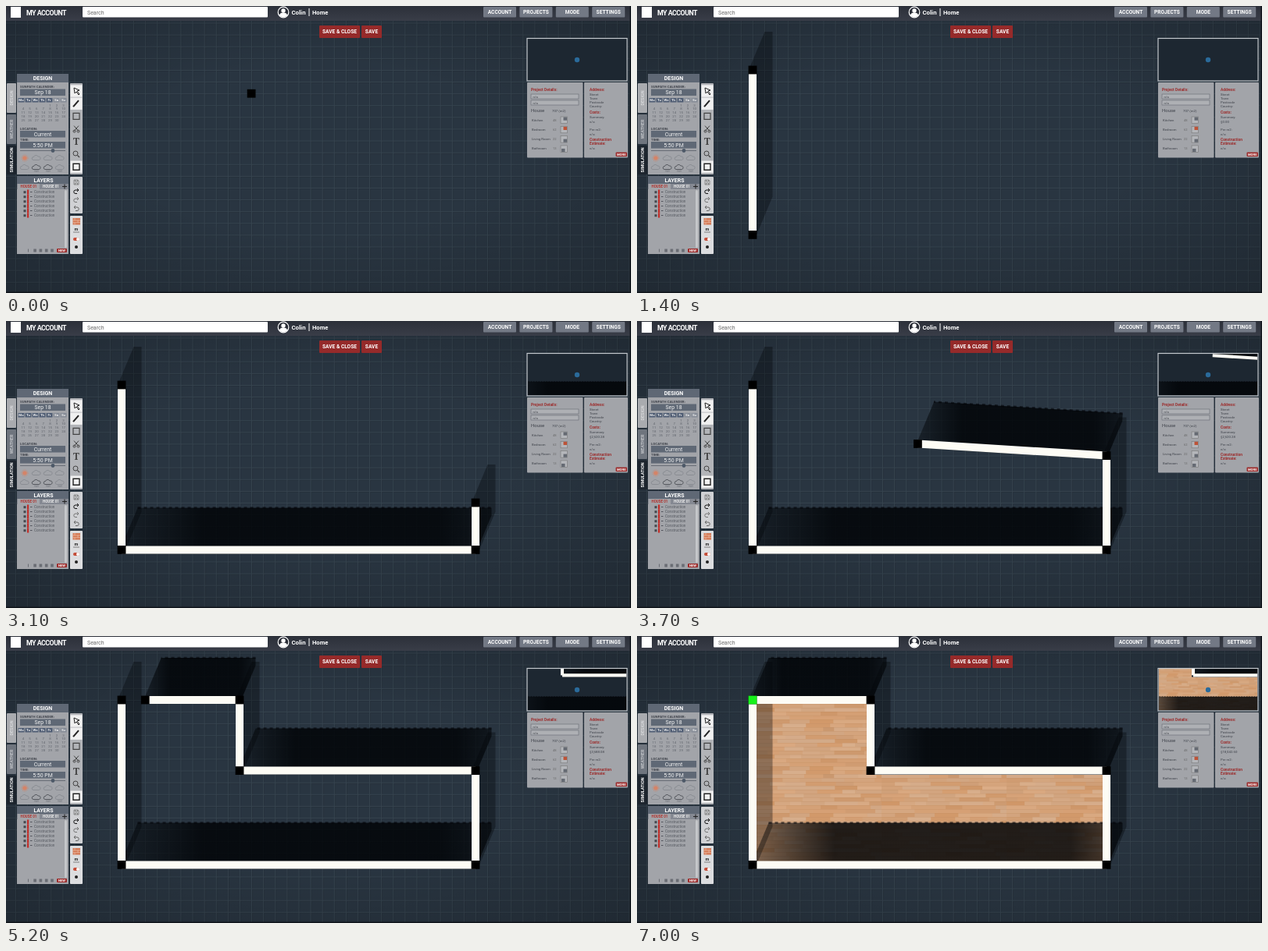
Recreate the animation shown at these times as an HTML page. Size 800x368 px, loop 7.1 s.

```html
<!DOCTYPE html>
<html lang="en">
<head>
<meta charset="utf-8">
<title>Floor plan editor</title>
<style>
html, body { margin: 0; width: 100%; height: 100%; overflow: hidden; background: #27333f; }
svg { display: block; width: 100%; height: 100%; font-family: Roboto, "Open Sans", sans-serif; }
</style>
</head>
<body>
<svg id="stage" viewBox="0 0 800 368"></svg>
<script>
const LOOP = 7100, STEP = 100, CELL = 15.1, OX = 148, OY = 82;
const RED = '#9c2b2b', INK = '#3d4149', BAR = '#5f6875', PANEL = '#a2a4a9';
const SHADOW = [20.5, -49], HALF = 5;

// Corners in grid cells, and the time each wall is started
const corners = [[0, 0], [0, 14], [30, 14], [30, 6], [10, 6], [10, 0], [0, 0]];
const starts = [800, 1700, 2800, 3400, 4300, 4900];
// Pointer: time, column, row
const path = [
  [0, 11, 2], [800, 0, 0], [1400, 0, 14], [1700, 0, 14], [2100, 25, 15], [2500, 30, 14],
  [2800, 30, 14], [3100, 30, 10], [3200, 30, 6], [3400, 30, 6], [3700, 14, 5], [4200, 10, 6],
  [4300, 10, 6], [4600, 10, 0], [4900, 10, 0], [5200, 2, 0], [5300, 2, 0], [5500, 0, 0]
];
const CLOSED = 5500, FLOOR = 5700;
const costs = [[0, 'n/a'], [900, '$0.00'], [1800, '$1,671.80'], [2900, '$2,620.28'],
  [4400, '$3,124.46'], [4800, '$3,688.08'], [5700, '$17,415.20'], [6800, '$18,042.60']];

let seed = 11;
const rand = () => (seed = (seed * 16807) % 2147483647) / 2147483647;

// Markup helpers
const rect = (x, y, w, h, fill, more = '') =>
  `<rect x="${x}" y="${y}" width="${w}" height="${h}" fill="${fill}" ${more}/>`;
const line = (d, stroke = INK, w = 1, more = '') =>
  `<path d="${d}" fill="none" stroke="${stroke}" stroke-width="${w}" ${more}/>`;
const text = (x, y, s, size, fill = INK, weight = 400, anchor = 'start', more = '') =>
  `<text x="${x}" y="${y}" font-size="${size}" fill="${fill}" font-weight="${weight}" text-anchor="${anchor}" ${more}>${s}</text>`;
const mid = (x, y, s, size, fill = '#fff', weight = 500, more = '') =>
  text(x, y, s, size, fill, weight, 'middle', more);
const button = (x, y, w, h, label, fill, size) =>
  rect(x, y, w, h, fill, 'rx="1"') + mid(x + w / 2, y + h / 2 + size * .36, label, size, '#fff', 600);
const at = (x, y, body) => `<g transform="translate(${x} ${y})">${body}</g>`;

function planks() {
  let s = rect(0, 0, 160, 60, '#d5a579');
  for (let y = 0; y < 60; y += 5) {
    for (let x = 0; x < 160;) {
      const w = Math.min(14 + rand() * 30, 160 - x);
      s += rect(x.toFixed(1), y, w.toFixed(1), 5, `hsl(27 ${46 + rand() * 8}% ${61 + rand() * 9}%)`);
      x += w;
    }
    s += rect(0, y, 160, .5, '#b98759', 'opacity=".5"');
  }
  return s;
}

function defs() {
  const stops = [[0, .4], [.22, .84], [.86, .84], [1, .6]]
    .map(([o, a]) => `<stop offset="${o}" stop-color="#000306" stop-opacity="${a}"/>`).join('');
  return `<defs>
    <linearGradient id="dark">${stops}</linearGradient>
    <linearGradient id="head" x2="0" y2="1"><stop stop-color="#2c3039"/><stop offset="1" stop-color="#393d48"/></linearGradient>
    <radialGradient id="vignette" r=".75"><stop offset=".4" stop-color="#000" stop-opacity="0"/><stop offset="1" stop-color="#000" stop-opacity=".25"/></radialGradient>
    <pattern id="grid" x="${OX}" y="${OY}" width="${CELL}" height="${CELL}" patternUnits="userSpaceOnUse">
      ${rect(0, 0, CELL, CELL, '#293541')}${line(`M0 .5H${CELL}M.5 0V${CELL}`, '#36444f')}
      ${line(`M1 1.5H${CELL}M1.5 1V${CELL}`, '#232e39', .8)}</pattern>
    <pattern id="wood" x="153" y="87" width="160" height="60" patternUnits="userSpaceOnUse">${planks()}</pattern>
    <clipPath id="mapView">${rect(668, 42, 126, 53, '#000')}</clipPath></defs>`;
}

function header() {
  const tabs = ['ACCOUNT', 'PROJECTS', 'MODE', 'SETTINGS'];
  return rect(0, 0, 800, 19, 'url(#head)') + rect(6, 1, 13, 14, '#fff') +
    text(26, 11.5, 'MY ACCOUNT', 8.8, '#fff', 600, 'start', 'letter-spacing="-.5"') +
    rect(98, 1, 237, 13.5, '#fff', 'rx="1"') + text(104, 10.7, 'Search', 7, '#666') +
    '<circle cx="355" cy="8" r="6.8" fill="#2b2e37" stroke="#fff" stroke-width="1.2"/>' +
    '<circle cx="355" cy="6" r="2.7" fill="#fff"/><path d="M350 12.5q0-4 5-4t5 4q-5 3.4-10 0" fill="#fff"/>' +
    text(365.5, 11, 'Colin', 7.8, '#fff', 600) + rect(387.5, 3, 1, 10, '#fff') +
    text(392, 11, 'Home', 7.6, '#fff', 600) +
    tabs.map((s, i) => button(611 + i * 46.4, 1, 42, 13.5, s, '#737985', 6.6)).join('') +
    button(401, 25, 52, 16, 'SAVE &amp; CLOSE', '#952a2a', 6.6) + button(455, 25, 26, 16, 'SAVE', '#952a2a', 6.6);
}

function calendar() {
  let s = '';
  ['Mo', 'Tu', 'We', 'Th', 'Fr', 'Sa', 'Su'].forEach((d, i) => {
    s += rect(15.5 + i * 9, 118, 8, 5.5, i < 5 ? '#4e5c73' : '#858b96') +
      mid(19.5 + i * 9, 122.4, d, 4.4, '#eee', 700);
  });
  for (let d = 1; d <= 30; d++) {
    const k = d + 3;
    s += mid(22 + k % 7 * 8.6, 128.5 + Math.floor(k / 7) * 4.9, d, 4.4, '#62666e', 400);
  }
  return s;
}

function weather() {
  const cloud = c => `<path d="M-4 2.5a2 2 0 0 1 .5-4a3 3 0 0 1 5.500-.5a2.300 2.300 0 0 1 1.500 4.500z" fill="none" stroke="${c}" stroke-width=".8"/>`;
  let s = '<circle cx="24" cy="195" r="2.8" fill="#d48468"/>' +
    '<circle cx="24" cy="195" r="4" fill="none" stroke="#d48468" stroke-dasharray="1 1.100"/>';
  for (let i = 1; i < 8; i++) {
    const x = 24 + i % 4 * 15, y = i < 4 ? 195 : 207;
    s += at(x, y, cloud(i === 5 || i === 6 ? '#44484f' : '#85888e') +
      (i > 4 ? line('M-2 3.500v2M0 3.500v2.500M2 3.500v2', '#666a71', .7) : ''));
  }
  return s;
}

function tools() {
  const icons = [
    line('M-3-4L4-1L1 0L4 4L3 5L0 1L-2 3Z', '#222'),
    line('M-4 4L3-4', '#222', 2),
    line('M-4-4H4V4H-4Z', '#444', 1.2),
    line('M-3-4L3 3M3-4L-3 3', '#444') + line('M-4 3a1.500 1.500 0 1 0 3 0a1.500 1.500 0 1 0-3 0M1 3a1.500 1.500 0 1 0 3 0a1.500 1.500 0 1 0-3 0', '#444'),
    mid(0, 4.3, 'T', 12, '#444', 700, 'font-family="Noto Serif, serif"'),
    '<circle cx="-1" cy="-1" r="3" fill="none" stroke="#444"/>' + line('M1.500 1.500L4 4', '#444', 1.3),
    line('M-4-4H4V4H-4Z', '#222', 1.4)
  ];
  let s = rect(82, 99, 16, 117, '#b2b4b8', 'rx="1"');
  icons.forEach((icon, i) => {
    const y = 109 + i * 16.2;
    if (i < 2 || i === 6) s += rect(82.5, y - 7.700, 15, 15.4, '#f0f0f0');
    s += at(90, y, icon);
  });
  const turn = c => line('M-2.500-1H1a2 2 0 0 1 0 4.500H-1M-1-3L-3-1L-1 1', c);
  s += rect(82, 219, 16, 47, '#d0d1d4', 'rx="1"') + rect(82, 269, 16, 49, '#dcdddf', 'rx="1"');
  s += at(90, 226, line('M-3-3H2L3-2V3H-3ZM-1.500-3V-1H1.500V-3M-1.500 3V1H1.500V3', '#777', .8));
  [['#111', -1], ['#777', -1], ['#666', 1]].forEach(([c, flip], i) => {
    s += `<g transform="translate(90 ${237 + i * 11}) scale(${flip} 1)">${turn(c)}</g>`;
  });
  return s + rect(85.500, 272, 9.500, 8.500, '#d47a56') +
    line('M85.500 274.800H95M85.500 277.700H95M88 272v2.800M92 274.800v2.900M88 277.700v2.800', '#f0c9b5', .6) +
    mid(90, 288, 'm', 5.500, '#222', 700) + line('M86 290H94', '#555', .7) +
    rect(86, 297, 8, 4, '#c44d38', 'rx="2"') + '<circle cx="92" cy="299" r="2" fill="#fff"/>' +
    '<circle cx="90" cy="309" r="2" fill="#222"/>';
}

function designPanel() {
  const field = (y, s) => rect(18, y, 58, 8.500, BAR) + mid(47, y + 6.800, s, 6.900, '#f2f2f2', 400);
  const side = (y, h, s, fill, ink) => rect(1, y, 12, h, fill, 'rx="1"') +
    mid(0, 0, s, 5.400, ink, 600, `transform="translate(9 ${y + h / 2}) rotate(-90)"`);
  return side(99, 38, 'DESIGN', '#a9abaf', '#d8d9db') + side(139, 38, 'WEATHER', '#6f757e', '#c3c6ca') +
    side(179, 37, 'SIMULATION', '#1d252e', '#fff') +
    rect(14, 87, 66, 11, BAR) + mid(47, 95.400, 'DESIGN', 7, '#fff', 700) +
    rect(14, 98, 66, 118, PANEL) + text(18, 104.700, 'SUNPATH CALENDER:', 4.400, INK, 700) +
    field(106.500, 'Sep 18') + calendar() + text(18, 158.700, 'LOCATION:', 4.400, INK, 700) +
    field(160, 'Current') + text(18, 172.600, 'TIME:', 4.400, INK, 700) + field(174, '5:50 PM') +
    rect(18, 185, 58, 1, '#666b74') + '<circle cx="60" cy="185.500" r="2.400" fill="#4d5968"/>' + weather();
}

function layersPanel() {
  let s = rect(14, 218, 66, 10, BAR) + mid(48, 225.900, 'LAYERS', 7, '#fff', 700) +
    rect(14, 228, 66, 90, PANEL) + rect(14, 228, 66, 7, '#858992') +
    rect(15, 228, 28, 7, PANEL) + text(18.500, 233.200, 'HOUSE 01', 4.500, '#b3322d', 700) +
    text(47, 233.200, 'HOUSE 01', 4.500, '#eee', 700) + line('M75 228.500V234.500M72 231.500H78', '#222') +
    rect(75, 236, 3, 74, '#c5c7ca', 'rx="1.500"');
  for (let i = 0; i < 6; i++) {
    const y = 238.500 + i * 6;
    s += rect(22.500, y - 1.300, 3, 3, '#44484f') + rect(27, y - 3, 2.200, 6, '#c22f2a') +
      line(`M31 ${y}h2.500`, INK, .8) + text(36, y + 1.600, 'Construction', 4.600, '#555960');
  }
  for (let i = 0; i < 5; i++) s += rect(28 + i * 7.300, 311.500, i ? 3.600 : 1, 4, '#6a6d74');
  return s + button(65, 311, 13, 5, 'NEW', RED, 4.200);
}

function details() {
  const box = y => rect(672, y, 61, 6, '#aeb0b4', 'stroke="#666a72" stroke-width=".6"') + text(674.500, y + 4.500, 'n/a', 4.200);
  let s = rect(667, 98, 71.500, 96.500, PANEL, 'rx="1"') + rect(740, 98, 56, 96.500, PANEL, 'rx="1"') +
    text(672, 108.500, 'Project Details:', 4.900, RED, 700) + box(113) + box(121) +
    text(672, 136, 'House', 6) + text(699, 136, '707 (m2)', 4.300);
  ['Kitchen', 'Bedroom', 'Living Room', 'Bathroom'].forEach((name, i) => {
    const y = 147.500 + i * 12.300;
    s += text(673, y, name, 4.300) + text(700, y, [48, 62, 22, 13][i], 4, '#666') +
      rect(710, y - 5.500, 8.500, 8.500, '#b4b6ba', 'stroke="#777" stroke-width=".6"') +
      rect(i === 3 ? 711 : 713.500, y - (i < 2 ? 5 : 1.500), 4.500, 4.200, i === 1 ? '#bd5338' : '#656a73');
  });
  const rows = [[114.500, 'Street'], [119.500, 'Town'], [124.500, 'Postcode'], [129.500, 'Country:'],
    [143.600, 'Summary:'], [160, 'Per m2:'], [165.600, 'n/a'], [183.500, 'n/a']];
  const heads = [[108.500, 'Address:'], [137.800, 'Costs:'], [173, 'Construction'], [178, 'Estimate:']];
  s += rows.map(([y, n]) => text(747, y, n, 4.300)).join('') +
    heads.map(([y, n]) => text(747, y, n, 4.800, RED, 700)).join('');
  return s + `<text id="cost" x="747" y="149.600" font-size="4.300" fill="${INK}"></text>` +
    button(780.500, 187.500, 14.500, 5.500, 'MORE', RED, 4.200);
}

const minimap = () => rect(667, 41, 128.500, 55.500, '#1d2731') +
  '<g clip-path="url(#mapView)"><use href="#plan" transform="matrix(.41 0 0 .41 589.400 -20.400)"/></g>' +
  rect(667, 41.500, 128, 54.500, 'none', 'stroke="#c4c8cd" stroke-width="1.200"') +
  '<circle cx="731" cy="69" r="3.200" fill="#2a6a9a"/>';

document.getElementById('stage').innerHTML = defs() + rect(0, 0, 800, 368, 'url(#grid)') +
  rect(0, 0, 800, 368, 'url(#vignette)') + '<g id="plan"></g><g id="dots"></g>' +
  header() + designPanel() + layersPanel() + tools() + minimap() + details() +
  rect(0, 366.500, 800, 1.500, '#10151b') + rect(798.500, 0, 1.500, 368, '#10151b');

const plan = document.getElementById('plan');
const dots = document.getElementById('dots');
const cost = document.getElementById('cost');
const place = ([c, r]) => [OX + c * CELL, OY + r * CELL];

function pointer(t) {
  const i = path.findIndex(p => p[0] > t);
  if (i < 0) return [0, 0];
  const a = path[i - 1], b = path[i], k = (t - a[0]) / (b[0] - a[0]);
  return [1, 2].map(n => Math.round(a[n] + (b[n] - a[n]) * k));
}

function hull(pts) {
  const cross = (o, a, b) => (a[0] - o[0]) * (b[1] - o[1]) - (a[1] - o[1]) * (b[0] - o[0]);
  const half = list => {
    const out = [];
    for (const p of list) {
      while (out.length > 1 && cross(out[out.length - 2], out[out.length - 1], p) <= 0) out.pop();
      out.push(p);
    }
    return out.slice(0, -1);
  };
  const sorted = [...pts].sort((a, b) => a[0] - b[0] || a[1] - b[1]);
  return [...half(sorted), ...half(sorted.reverse())];
}

function shade([x1, y1], [x2, y2]) {
  const len = Math.hypot(x2 - x1, y2 - y1);
  if (!len) return '';
  const nx = -(y2 - y1) / len * HALF, ny = (x2 - x1) / len * HALF;
  const bar = [[x1 + nx, y1 + ny], [x2 + nx, y2 + ny], [x2 - nx, y2 - ny], [x1 - nx, y1 - ny]];
  const [sx, sy] = SHADOW;
  const far = bar.map(([x, y]) => [x + sx, y + sy]);
  const flat = Math.abs(x2 - x1) > Math.abs(y2 - y1);
  const fill = flat ? 'fill="url(#dark)"' : 'fill="#000306" fill-opacity=".34"';
  let s = `<polygon points="${hull([...bar, ...far]).join(' ')}" ${fill}/>`;
  if (flat) {
    const edge = y => y + sy - HALF;
    s += line(`M${x1 + sx} ${edge(y1)}L${x2 + sx} ${edge(y2)}`, '#000306', 2.500, 'stroke-dasharray="4 4" opacity=".55"');
  }
  return s;
}

function draw(t) {
  const tip = pointer(t);
  const live = starts.filter(s => t >= s).length;
  const walls = [];
  for (let i = 0; i < live; i++)
    walls.push([place(corners[i]), place(i === live - 1 ? tip : corners[i + 1])]);

  const floor = t >= FLOOR ? '<path d="M153 87H294V178H596V289H153Z" fill="url(#wood)"/>' : '';
  plan.innerHTML = floor + walls.map(([a, b]) => shade(a, b)).join('') +
    walls.map(([a, b]) => line(`M${a}L${b}`, '#fdfcf5', HALF * 2)).join('');

  const dot = ([x, y], fill) => rect(x - 5.400, y - 5.400, 10.800, 10.800, fill);
  dots.innerHTML = walls.map(([a]) => dot(a, '#000')).join('') +
    dot(place(tip), t >= CLOSED ? '#16f01a' : '#000');
  cost.textContent = costs.filter(c => c[0] <= t).pop()[1];
}

let last = -1;
const origin = performance.now();
function tick() {
  const t = Math.floor(((performance.now() - origin) % LOOP) / STEP) * STEP;
  if (t !== last) draw(last = t);
  requestAnimationFrame(tick);
}
tick();
</script>
</body>
</html>
```
